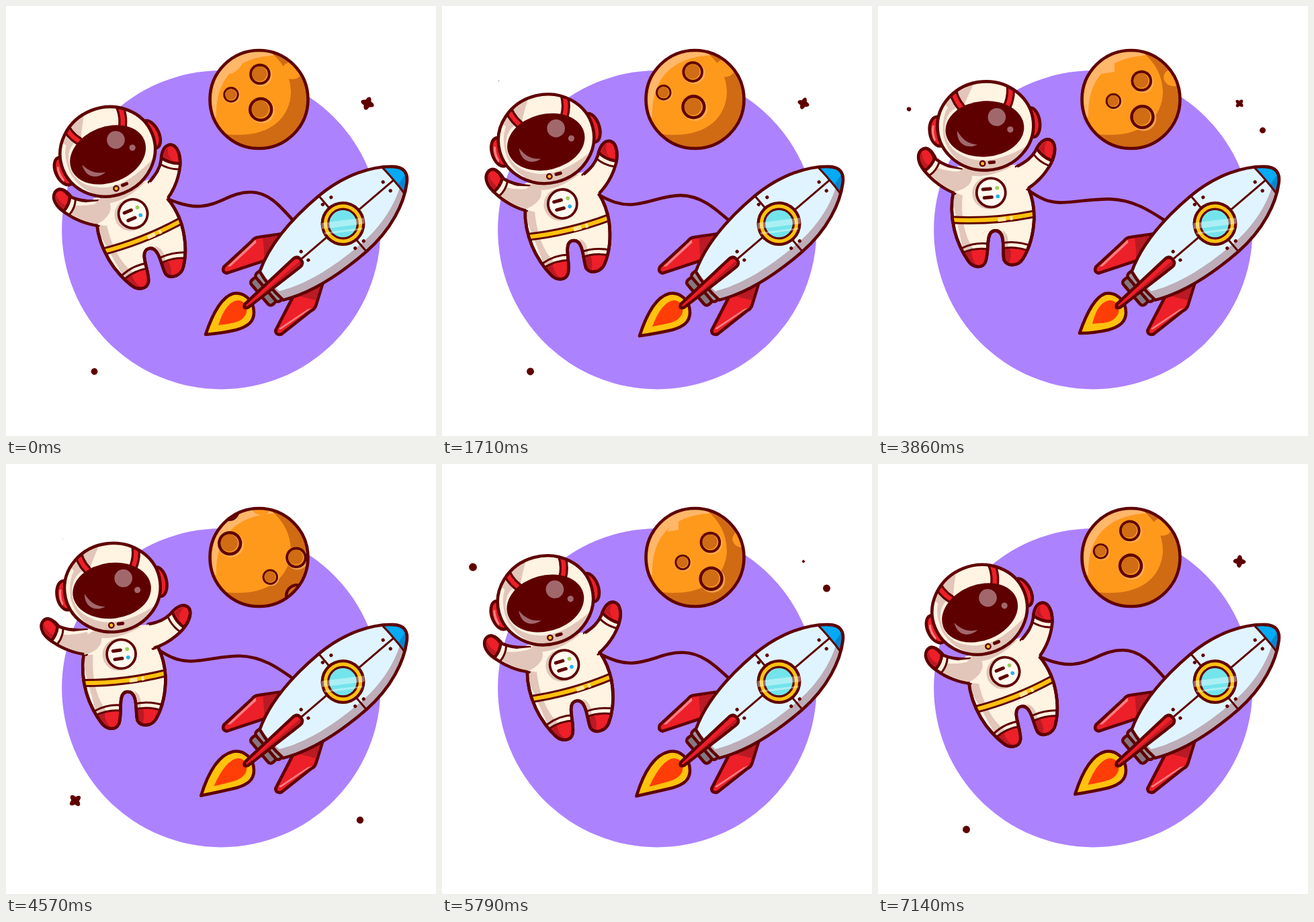
An HTML page that plays this animation: 640 px wide and 640 px high, repeating every 7210 ms.

```html
<!DOCTYPE html>
<html lang="en">
<head>
<meta charset="utf-8">
<title>Astronaut and rocket</title>
<style>
  html, body { margin: 0; width: 100%; height: 100%; overflow: hidden; background: #fff; }
  svg { display: block; width: 100vw; height: 100vh; }
  .line { stroke: #5f0000; stroke-width: 4.6; stroke-linecap: round; stroke-linejoin: round; }
  .thin { stroke: #5f0000; stroke-width: 3; stroke-linecap: round; fill: none; }
  .none { fill: none; }
  .dark { fill: #5f0000; }
  .suit { fill: #fff3e2; }
  .shade { fill: #e1c6b9; }
  .red { fill: #ed1f28; }
  .deep { fill: #b91a24; }
  .pink { fill: #f67f83; }
  .gold { fill: #ffc20e; }
</style>
</head>
<body>
<svg viewBox="0 0 640 640">
  <defs>
    <path id="hull" d="M-140 -26C-105 -46 -60 -55 0 -54.5C50 -54 90 -36 112 -16Q130 0 112 16C90 36 50 54 0 54.5C-60 55 -105 47 -141 29Q-145 0 -140 -26Z"/>
    <g id="fin">
      <path class="red line" d="M-78 -47L-108 -66Q-114 -70 -120 -68L-176 -66Q-184 -62 -179 -56L-120 -32Z"/>
      <path class="deep" d="M-82 -47L-104 -61L-122 -36L-118 -34Z"/>
    </g>
    <path id="body" d="M112 276C108 294 109 314 113 332C117 350 126 368 133 378C140 389 154 391 159 381C163 372 162 358 164 346Q166 334 174 334Q183 334 185 346C187 358 185 370 187 378C192 388 208 387 215 376C225 360 231 340 232 315C232 298 229 284 224 272"/>
    <ellipse id="helmet" cx="160" cy="178" rx="71.5" ry="66" transform="rotate(-4 160 178)"/>
    <g id="crater">
      <circle r="1.04" cx=".1" cy=".1" fill="#ffb76a" opacity=".7"/>
      <circle r="1" class="dark"/>
      <circle r=".75" fill="#f2921f"/>
      <circle r=".69" cx="-.05" cy="-.04" fill="#cf6c14"/>
    </g>
    <path id="star" class="dark" d="M0 -10Q3 -10 4.2 -4.2Q10 -3 10 0Q10 3 4.2 4.2Q3 10 0 10Q-3 10 -4.2 4.2Q-10 3 -10 0Q-10 -3 -4.2 -4.2Q-3 -10 0 -10Z"/>
    <circle id="dot" class="dark" r="1"/>
    <clipPath id="hullClip"><use href="#hull"/></clipPath>
    <clipPath id="bodyClip"><use href="#body"/></clipPath>
    <clipPath id="helmetClip"><use href="#helmet"/></clipPath>
    <clipPath id="planetClip"><circle cx="376.5" cy="139" r="73"/></clipPath>
    <clipPath id="glowClip"><path d="M300 170V64H402L352 82L352 98L325 102L313 140V170Z"/></clipPath>
  </defs>

  <circle cx="320.3" cy="333.2" r="237.2" fill="#ad82ff"/>
  <g id="sparks"></g>

  <g clip-path="url(#planetClip)">
    <circle cx="376.5" cy="139" r="73" fill="#ff991c"/>
    <path fill="#ffb76a" d="M310 165C294 105 335 66 380 66L408 73C350 74 312 100 313 165Z"/>
    <g clip-path="url(#glowClip)"><ellipse id="glow" rx="23" ry="15" fill="#ffb76a"/></g>
    <path fill="#d06b14" d="M390 66C412 82 424 104 424 130C422 168 390 200 322 190C350 218 385 216 410 206C455 185 462 130 440 96Q420 70 390 66Z"/>
    <ellipse id="notch" rx="15" ry="13" fill="#ff991c"/>
    <g id="craters"></g>
  </g>
  <circle class="none line" cx="376.5" cy="139" r="73"/>

  <path id="rope" class="none line"/>

  <path id="outerFlame" class="gold line"/>
  <path id="innerFlame" fill="#ff3d06"/>

  <g transform="translate(501 324) rotate(-40.5)">
    <use href="#fin"/>
    <use href="#fin" transform="scale(1 -1)"/>
    <path class="pink" d="M-114 -66L-172 -63L-168 -60L-116 -62ZM-116 66L-172 60L-174 57L-122 63Z"/>
    <rect class="line" x="-162" y="-24" width="13" height="48" rx="5" fill="#85777f"/>
    <rect class="line" x="-150" y="-27" width="13" height="54" rx="5" fill="#9d9098"/>
    <g clip-path="url(#hullClip)">
      <rect x="-150" y="-60" width="290" height="120" fill="#bcadb9"/>
      <use href="#hull" fill="#e0f4ff" transform="translate(4 -14)"/>
      <path fill="#04aaf5" d="M98 -40H140V40H98Q102 0 98 -40Z"/>
      <path fill="#0786d0" d="M99 10L130 2V40H98Z"/>
      <path class="thin" d="M98 -40Q102 0 98 40M-84 0H99M0 -56V56"/>
    </g>
    <use href="#hull" class="none line"/>
    <g class="dark">
      <circle cx="-4" cy="-41" r="2.6"/><circle cx="12.5" cy="-41" r="2.6"/>
      <circle cx="-9.5" cy="40" r="2.6"/><circle cx="7" cy="40" r="2.6"/>
      <circle cx="86" cy="-8" r="2.6"/><circle cx="86" cy="9" r="2.6"/>
      <circle cx="-74" cy="-8.5" r="2.6"/><circle cx="-74" cy="8" r="2.6"/>
    </g>
    <path class="red line" d="M-82 0Q-82 -8 -90 -8L-188 -3.5Q-196 0 -188 3.5L-90 8Q-82 8 -82 0Z"/>
    <path class="deep" d="M-84 1Q-86 5.5 -92 5.5L-186 2L-100 1Z"/>
  </g>
  <g transform="translate(501.5 324)">
    <circle class="dark" r="33"/><circle class="gold" r="28.7"/>
    <circle class="dark" r="23.5"/><circle r="20.3" fill="#73e4ec"/>
    <path fill="#fff" opacity=".4" d="M-32 -1L32 -9V0L-32 8ZM-28 13L29 6V9L-27 16Z"/>
  </g>

  <g id="astronaut">
    <use href="#body" class="suit line"/>
    <path class="suit" d="M112 277L118 238L212 236L224 273Z"/>
    <g clip-path="url(#bodyClip)">
      <path class="shade" d="M108 276L126 276Q120 330 142 362L128 372ZM184 333Q190 350 186 362L192 362Q197 340 184 333Z"/>
      <path class="red" d="M124 367Q145 358 166 362V395H124ZM182 361Q204 356 228 366V395H182Z"/>
      <path class="deep" d="M128 367L139 362Q137 380 152 390H125ZM182 361L196 360Q200 375 190 390H182Z"/>
      <path class="thin" d="M124 360Q145 350 166 354M124 367Q145 358 166 362M182 353Q205 348 230 358M182 361Q204 356 228 366"/>
      <path class="thin" style="stroke-width:12" d="M106 317.5Q172 321.5 236 308.5"/>
      <path class="thin" style="stroke:#ffc20e;stroke-width:6" d="M106 317.5Q172 321.5 236 308.5"/>
      <path class="thin" style="stroke:#ffe69a;stroke-width:6;stroke-linecap:butt" d="M178 317.8L190 316.4M196 315.8L200 315.1"/>
    </g>
    <use href="#body" class="none line"/>

    <g id="leftArm">
      <path class="suit line" d="M114 278C98 272 82 260 72 248C62 238 57 222 64 214C72 207 80 213 86 227C97 236 110 240 124 243"/>
      <path class="suit" d="M114 277L106 240L124 243L150 250L135 285Z"/>
      <path class="shade" d="M112 275C100 270 87 260 79 251L88 240Q104 246 124 246V272Z"/>
      <path class="red line" d="M70 244C60 236 57 221 64 214C72 207 79 213 84 226Q80 237 70 244Z"/>
      <path class="deep" d="M70 240C62 233 60 222 65 217Q66 230 75 237Z"/>
      <path class="thin" d="M77 251Q87 244 91 232"/>
    </g>
    <path class="shade" d="M113 276L112 250L130 240L200 238Q165 256 140 252Q140 270 113 276Z"/>
    <g id="rightArm">
      <path class="suit line" d="M222 272C238 262 250 248 258 233C266 216 264 202 256 199C247 196 240 204 234 216C228 226 220 232 206 239"/>
      <path class="suit" d="M222 271L226 250L206 239L196 250L210 280Z"/>
      <path class="red line" d="M236 212C241 203 247 196 256 199C264 202 265 216 259 230Q246 226 236 212Z"/>
      <path class="deep" d="M240 212Q246 202 251 202Q245 212 250 222Z"/>
      <path class="thin" d="M231 220Q240 232 253 237"/>
    </g>

    <circle class="shade" cx="164" cy="278" r="24"/>
    <circle cx="168" cy="277.5" r="21.5" fill="#fff9f0" stroke="#5f0000" stroke-width="3.8"/>
    <path class="thin" style="stroke-width:5" d="M156 272.5L167 271.5M158 285L169 284"/>
    <circle cx="177" cy="270.5" r="2.9" fill="#9ccf5c"/><circle cx="178" cy="283" r="2.9" fill="#25b4f0"/>

    <ellipse class="red line" cx="90" cy="186" rx="13" ry="22" transform="rotate(-8 90 186)"/>
    <ellipse class="red line" cx="229" cy="173" rx="12" ry="22" transform="rotate(-8 229 173)"/>
    <path class="pink" d="M81 177Q78 190 84 201L86 198Q82 188 84 177Z"/>
    <use href="#helmet" class="suit"/>
    <g clip-path="url(#helmetClip)">
      <path class="shade" d="M148 106Q136 128 128 148Q105 150 100 175Q96 210 130 224Q165 240 222 208Q200 248 155 246Q85 240 86 180Q88 120 148 106Z"/>
      <path class="suit" d="M88 178Q89 158 98 143L104 150Q95 165 97 190Q100 212 120 230Q88 215 88 178Z"/>
      <path class="thin" style="stroke-width:13" d="M111 118Q112 136 124 150M197 114Q200 134 192 150"/>
      <path class="thin" style="stroke:#ed1f28;stroke-width:6.5" d="M111 118Q112 136 124 150M197 114Q200 134 192 150"/>
    </g>
    <use href="#helmet" class="none line"/>
    <ellipse class="dark" cx="159" cy="182.5" rx="58.5" ry="41.5" transform="rotate(-4 159 182.5)"/>
    <g fill="#a1686c">
      <circle cx="177" cy="165" r="13.3"/><circle cx="197" cy="183.5" r="4.6"/>
      <path d="M118 185C117 205 132 213 148 206C134 205 125 198 118 185Z"/>
    </g>
    <circle class="gold" cx="155.5" cy="234" r="3.7" stroke="#5f0000" stroke-width="2.4"/>
    <path class="thin" style="stroke-width:5" d="M166 232.5L172.5 232"/>
  </g>
</svg>
<script>
const LOOP = 7210, CYCLE = 1800, STEP = 1000 / 14, TAU = 2 * Math.PI;
const el = id => document.getElementById(id);
const place = (node, value) => node.setAttribute('transform', value);

function addUse(parent, shape) {
  const node = document.createElementNS('http://www.w3.org/2000/svg', 'use');
  node.setAttribute('href', '#' + shape);
  return el(parent).appendChild(node);
}

// Each spark grows and shrinks once per cycle, from start for a given span.
const sparks = [
  ['star', 538, 145, 1.02, 0.8, 0.45], ['star', 103, 501, 1, 0.4, 0.32],
  ['dot', 84.5, 111.5, 9, 0.535, 0.425], ['dot', 131.5, 544, 5.5, 0.82, 0.28],
  ['dot', 527, 530, 5.2, 0.4, 0.29], ['dot', 46, 153.5, 7, 0.08, 0.42],
  ['dot', 572.5, 185, 5.5, 0.02, 0.4]
].map(([shape, x, y, size, start, span]) =>
  ({ node: addUse('sparks', shape), x, y, size, start, span }));

// Position at the start of a cycle, radius, and travel per cycle.
const craters = [-1, 0, 1].flatMap(turn =>
  [[379.2, 154, 18.2, 100, 78], [378, 101.5, 15.8, 100, 70], [335, 132, 11.7, 108, 67]]
    .map(([x, y, r, dx, dy]) => ({ node: addUse('craters', 'crater'), turn, x, y, r, dx, dy })));

function lerpPath(a, b, k) {
  const n = a.map((v, i) => (v + (b[i] - v) * k).toFixed(2));
  return `M${n.slice(0, 2)}C${n.slice(2)}`;
}
const ropeLow = [243, 288, 262, 296, 276, 299, 290, 298, 318, 296, 335, 277, 364, 277, 392, 277, 410, 300, 428, 320];
const ropeHigh = [222, 273, 240, 286, 254, 293, 273, 292.5, 300, 291, 322, 287, 345, 287.5, 380, 288.5, 405, 305, 428, 320];

const flicker = [[0, .21], [.43, .43], [.53, 1], [.7, 0], [.87, 0], [1, .21]];
function flameLength(phase) {
  const i = flicker.findIndex(([x]) => x > phase);
  const [x0, y0] = flicker[i - 1], [x1, y1] = flicker[i];
  return y0 + (y1 - y0) * (phase - x0) / (x1 - x0);
}

function draw(t) {
  const phase = t / CYCLE % 1;

  for (const s of sparks) {
    const age = ((phase - s.start + 1) % 1) / s.span;
    const size = age < 1 ? s.size * Math.sin(Math.PI * age) : 0;
    place(s.node, `translate(${s.x} ${s.y}) rotate(${20 + t * 0.2625}) scale(${size})`);
  }

  for (const c of craters) {
    const move = phase + c.turn;
    place(c.node, `translate(${c.x + c.dx * move} ${c.y + c.dy * move}) scale(${c.r})`);
  }
  const drift = phase - Math.round(phase);
  place(el('notch'), `translate(${426 + 100 * drift} ${96 + 72 * drift})`);
  place(el('glow'), `translate(${333 + 100 * drift} ${85 + 72 * drift}) rotate(-35)`);

  const low = (1 + Math.cos(TAU * t / 7200)) / 2;
  place(el('astronaut'), `translate(${167 + 21 * low} ${277 + 32 * low}) rotate(${-17.7 * low}) translate(-167 -277)`);
  el('rope').setAttribute('d', lerpPath(ropeHigh, ropeLow, low));

  const wave = Math.cos(TAU * phase) - 0.63;
  place(el('leftArm'), `rotate(${8 * wave} 103 267)`);
  place(el('rightArm'), `rotate(${-11 * wave} 220 251)`);

  const reach = flameLength(t / 150 % 1);
  const x = 300 - 14 * reach, y = 487 + 9.5 * reach;
  el('outerFlame').setAttribute('d',
    `M${x} ${y}Q${x + 18} 435 338 428C354 425 369 438 369 456C369 470 360 477 343 482Q322 487 ${x} ${y}Z`);
  el('innerFlame').setAttribute('d',
    `M${x + 19} ${y - 14}Q327 440 345 438C356 438 361 450 357 459C350 471 340 472 ${x + 19} ${y - 14}Z`);
}

function tick() {
  const t = performance.now() % LOOP;
  draw(Math.floor((t + 5) / (LOOP / 101)) % 101 * STEP);
  requestAnimationFrame(tick);
}
tick();
</script>
</body>
</html>
```
